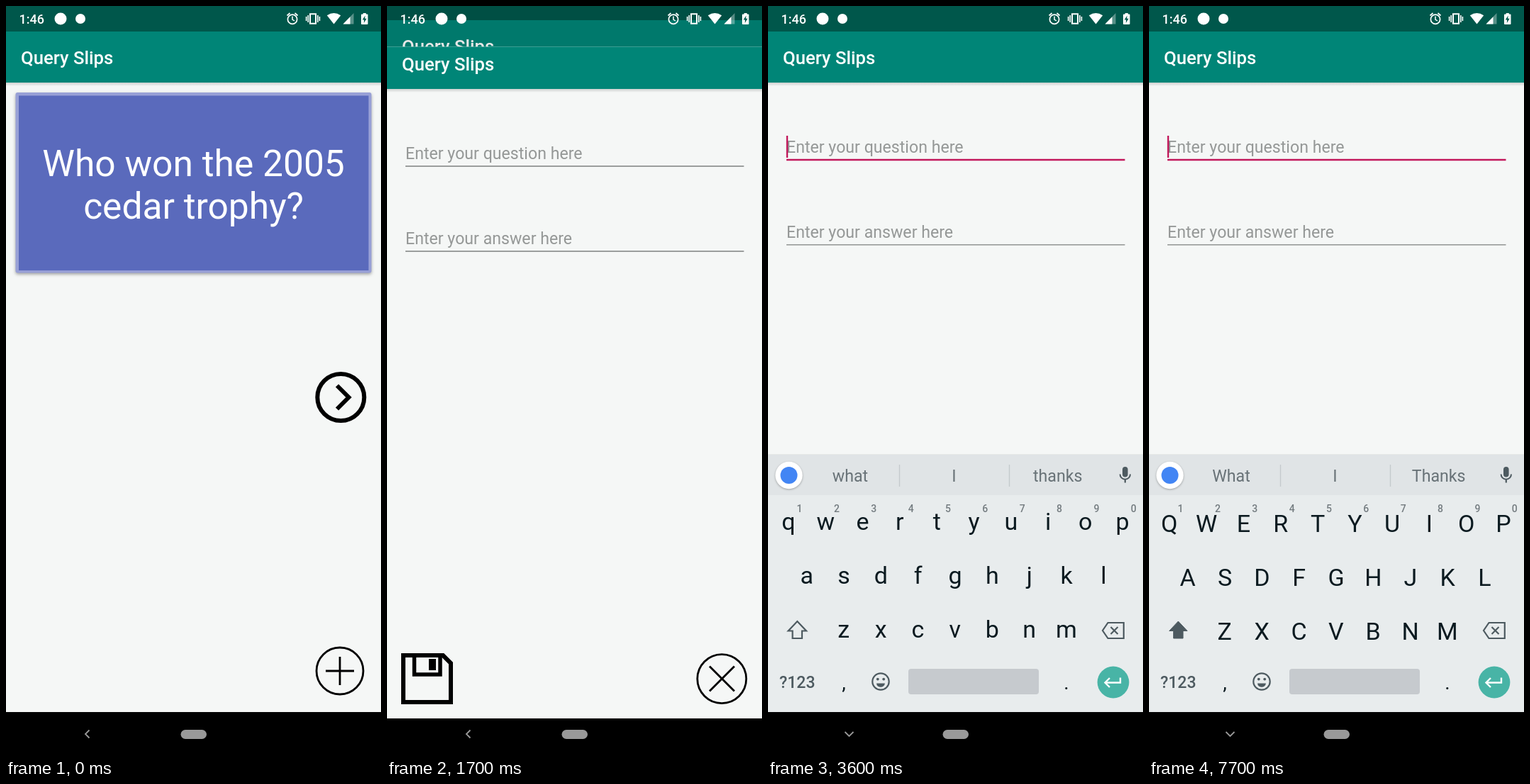
Recreate the animation shown at these times as an HTML page with a canvas. Size 529x1058 px, loop 8000 ms.

```html
<!DOCTYPE html>
<html lang="en">
<head>
<meta charset="utf-8">
<title>Flash cards</title>
<style>
html, body { margin: 0; width: 100%; height: 100%; overflow: hidden; background: #000; }
canvas { display: block; width: 100%; height: 100%; }
</style>
</head>
<body>
<canvas id="stage" width="529" height="1058"></canvas>
<script>
const W = 529, H = 1058, NAV = 996, LOOP = 8000;
const OPEN = 1483, FOCUS = 2500, KEYBOARD = 2610, SHIFT = 4100;
const BLINKS = [3100, 3600, 4100, 4600, 5100, 5600, 6100, 6600, 7200, 7700];
const PAPER = '#f5f7f6', PINK = '#c2185b', KEY = '#0b1a20', ICON = '#4d5a60';

const screen = document.getElementById('stage').getContext('2d');
const layer = document.createElement('canvas');
layer.width = W;
layer.height = H;
let c = screen;

// drawing helpers
function rect(x, y, w, h, fill, r = 0) {
  c.fillStyle = fill;
  c.beginPath();
  c.roundRect(x, y, w, h, r);
  c.fill();
}

function disc(x, y, r, fill) {
  c.fillStyle = fill;
  c.beginPath();
  c.arc(x, y, r, 0, 7);
  c.fill();
}

function ring(x, y, r, width, color) {
  c.strokeStyle = color;
  c.lineWidth = width;
  c.beginPath();
  c.arc(x, y, r, 0, 7);
  c.stroke();
}

function trace(points, close) {
  c.beginPath();
  for (let i = 0; i < points.length; i += 2) c.lineTo(points[i], points[i + 1]);
  if (close) c.closePath();
}

function line(points, width, color, close = false) {
  trace(points, close);
  c.strokeStyle = color;
  c.lineWidth = width;
  c.stroke();
}

function shape(points, fill) {
  trace(points, true);
  c.fillStyle = fill;
  c.fill();
}

function text(str, x, y, size, color, align = 'left', weight = 400) {
  c.font = `${weight} ${size}px Roboto, sans-serif`;
  c.textAlign = align;
  c.fillStyle = color;
  c.fillText(str, x, y);
}

function fade(y, h, alpha) {
  const g = c.createLinearGradient(0, y, 0, y + h);
  g.addColorStop(0, `rgba(0,0,0,${alpha})`);
  g.addColorStop(1, 'rgba(0,0,0,0)');
  c.fillStyle = g;
  c.fillRect(0, y, W, h);
}

// easing
const clamp = v => Math.min(1, Math.max(0, v));
const progress = (t, start, length) => clamp((t - start) / length);

function bezier(x, [x0, y0, x1, y1, x2, y2, x3, y3]) {
  const at = (s, a, b, d, e) =>
    a * (1 - s) ** 3 + 3 * b * s * (1 - s) ** 2 + 3 * d * s * s * (1 - s) + e * s ** 3;
  let lo = 0, hi = 1;
  for (let i = 0; i < 24; i++) {
    const mid = (lo + hi) / 2;
    if (at(mid, x0, x1, x2, x3) < x) lo = mid; else hi = mid;
  }
  return at(lo, y0, y1, y2, y3);
}

const slowIn = x => bezier(x, [0, 0, 0.4, 0, 0.2, 1, 1, 1]);
const extraSlowIn = x => x < 1 / 6
  ? bezier(x, [0, 0, 0.05, 0, 0.1333, 0.06, 0.1667, 0.4])
  : bezier(x, [0.1667, 0.4, 0.2083, 0.82, 0.25, 1, 1, 1]);

// screens
function frame() {
  rect(0, 0, W, NAV, PAPER);
  fade(108, 5, 0.16);
  rect(0, 0, W, 36, '#00574b');
  rect(0, 36, W, 72, '#008577');
  text('Query Slips', 21, 82, 25.7, '#fff', 'left', 500);
}

function cardScreen() {
  frame();
  c.save();
  c.shadowColor = 'rgba(0,0,0,.35)';
  c.shadowBlur = 4;
  c.shadowOffsetY = 2;
  rect(13.5, 122, 502, 254.5, '#98a0d6', 3);
  c.restore();
  rect(18, 126.5, 493.5, 246.5, '#5a6abc');
  text('Who won the 2005', 264.5, 240, 51.5, '#fff', 'center');
  text('cedar trophy?', 264.5, 300, 51.5, '#fff', 'center');

  ring(472.3, 552, 33, 6, '#000');
  line([467, 535.5, 483.5, 552, 467, 568.5], 6, '#000');
  ring(471, 938, 33, 2.8, '#000');
  line([451, 938, 491, 938], 2.8, '#000');
  line([471, 918, 471, 958], 2.8, '#000');
}

function field(hint, y, focused) {
  text(hint, 26, y - 10, 23.15, '#959897');
  if (focused) rect(26, y - 1.2, 477.5, 2.5, PINK);
  else rect(26, y - 0.8, 477.5, 1.4, '#7e807f');
}

function formScreen(t) {
  const focused = t >= FOCUS;
  frame();
  field('Enter your question here', 217, focused);
  field('Enter your answer here', 337, false);
  const blinks = BLINKS.filter(b => t >= b).length;
  if (focused && blinks % 2 === 0) rect(25.8, 183, 2.4, 31, PINK);

  line([23, 907, 79, 907, 90, 918, 90, 973, 23, 973], 6, '#000', true);
  line([38.5, 907, 38.5, 934, 75, 934, 75, 907], 5.5, '#000');
  rect(59, 912, 10, 16, '#000');
  ring(472.3, 940, 34.5, 2.8, '#000');
  line([455, 922.5, 490, 957.5], 2.8, '#000');
  line([490, 922.5, 455, 957.5], 2.8, '#000');
}

function statusIcons() {
  const white = '#fff';
  text('1:46', 18.5, 25, 18, white, 'left', 500);
  disc(77, 18, 8.5, white);
  disc(105, 18, 7, white);

  ring(404, 18.8, 6.6, 1.7, white);
  line([404, 14.5, 404, 19, 407, 21], 1.5, white);
  line([396.5, 13.5, 400.5, 10], 1.7, white);
  line([411.5, 13.5, 407.5, 10], 1.7, white);

  line([429, 11.3, 437, 11.3, 437, 24.7, 429, 24.7], 2, white, true);
  for (const side of [-1, 1]) {
    line([433 + side * 6.8, 13, 433 + side * 6.8, 23], 1.6, white);
    line([433 + side * 9.4, 15, 433 + side * 9.4, 21], 1.6, white);
  }

  c.fillStyle = white;
  c.beginPath();
  c.moveTo(462.5, 25.5);
  c.lineTo(452.8, 13.3);
  c.quadraticCurveTo(462.5, 6.5, 472.2, 13.3);
  c.fill();

  shape([490.5, 10, 490.5, 25.5, 475.5, 25.5], 'rgba(255,255,255,.35)');
  shape([485.5, 15.2, 485.5, 25.5, 475.5, 25.5], white);

  rect(501, 11.5, 9.5, 14.5, white, 1);
  rect(503.8, 10, 4, 2, white);
  shape([506.6, 13.5, 502.8, 19.6, 505.2, 19.6, 504.8, 24, 508.7, 17.8, 506.2, 17.8], '#00574b');
}

function navIcons(down) {
  const glow = 'rgba(255,255,255,.6)';
  rect(246.5, 1021, 36.5, 13, glow, 6.5);
  line(down ? [108.5, 1024, 114.5, 1030, 120.5, 1024] : [117.5, 1021.5, 112, 1027, 117.5, 1032.5], 1.8, glow);
}

// keyboard
function keyRow(keys, x, y, upper) {
  [...keys].forEach((k, i) =>
    text(upper ? k.toUpperCase() : k, x + i * 52.35, upper ? y + 3 : y, 34, KEY, 'center'));
}

function suggestions(upper) {
  rect(0, 633, W, 57, '#e0e4e6');
  c.save();
  c.shadowColor = 'rgba(0,0,0,.3)';
  c.shadowBlur = 3;
  c.shadowOffsetY = 1;
  disc(29.5, 662, 19.2, '#fff');
  c.restore();
  disc(29.5, 662, 12, '#4285f4');
  const words = upper ? ['What', 'I', 'Thanks'] : ['what', 'I', 'thanks'];
  [116, 262.5, 408.7].forEach((x, i) => text(words[i], x, 671, 23.2, '#687277', 'center'));
  for (const x of [185.5, 340.5]) rect(x - 0.7, 647, 1.4, 31, '#c4cacd');

  rect(500, 650, 7.6, 14.5, ICON, 3.8);
  c.strokeStyle = ICON;
  c.lineWidth = 2;
  c.beginPath();
  c.arc(503.8, 660.5, 7.2, 0, Math.PI);
  c.stroke();
  line([503.8, 667.5, 503.8, 672.5], 2.2, ICON);
}

function specialKeys(upper) {
  const arrow = [41.3, 868, 54, 881.5, 48, 881.5, 48, 892, 34.6, 892, 34.6, 881.5, 28.6, 881.5];
  if (upper) shape(arrow, ICON);
  line(arrow, upper ? 1 : 2.2, ICON, true);

  line([479.5, 870, 501.8, 870, 501.8, 892, 479.5, 892, 472, 881], 2.2, ICON, true);
  line([483.5, 876, 493.5, 886], 2.2, ICON);
  line([493.5, 876, 483.5, 886], 2.2, ICON);

  text('?123', 41.3, 961.5, 23, ICON, 'center', 500);
  text(',', 107, 964, 28, KEY, 'center');
  text('.', 421, 964, 28, KEY, 'center');

  ring(159, 953, 11.7, 2.2, ICON);
  disc(154.8, 949.6, 1.9, ICON);
  disc(163.2, 949.6, 1.9, ICON);
  c.fillStyle = ICON;
  c.beginPath();
  c.arc(159, 954.8, 6, 0.1, Math.PI - 0.1);
  c.fill();

  rect(198, 935, 184, 36, '#c6cace', 4);
  disc(487, 954, 22.4, '#48b4a6');
  line([497, 947.5, 497, 954.5, 476, 954.5], 2.4, '#fff');
  line([482, 948, 475.5, 954.5, 482, 961], 2.4, '#fff');
}

function keyboard(upper) {
  c.clearRect(0, 0, W, H);
  rect(0, 632, W, 1, 'rgba(0,0,0,.06)');
  rect(0, 633, W, NAV - 633, '#e8eced');
  suggestions(upper);
  keyRow('qwertyuiop', 28.8, 739, upper);
  keyRow('asdfghjkl', 54.7, 815, upper);
  keyRow('zxcvbnm', 106.8, 890.5, upper);
  [...'1234567890'].forEach((n, i) =>
    text(n, 44.6 + i * 52.35, 713.5, 14, '#747c80', 'center', 500));
  specialKeys(upper);
}

function shifted(dy, paint) {
  c.save();
  c.translate(0, dy);
  paint();
  c.restore();
}

function openForm(t) {
  const x = progress(t, OPEN, 425), p = slowIn(x), reveal = extraSlowIn(x);
  shifted(-0.019 * H * p, cardScreen);
  rect(0, 0, W, NAV, `rgba(0,0,0,${0.1 * reveal})`);
  shifted(0.041 * H * (1 - p), () => {
    c.beginPath();
    c.rect(0, (1 - reveal) * H, W, H);
    c.clip();
    formScreen(t);
  });
}

function draw(t) {
  c = screen;
  rect(0, 0, W, H, '#000');
  if (t < OPEN) cardScreen();
  else if (t < OPEN + 425) openForm(t);
  else formScreen(t);

  if (t >= KEYBOARD) {
    const p = 1 - (1 - progress(t, KEYBOARD, 220)) ** 2;
    c = layer.getContext('2d');
    keyboard(t >= SHIFT);
    c = screen;
    c.globalAlpha = p;
    c.drawImage(layer, 0, Math.round(120 * (1 - p)));
    c.globalAlpha = 1;
  }
  statusIcons();
  navIcons(t >= KEYBOARD);
}

const begin = performance.now();
function tick() {
  draw((performance.now() - begin) % LOOP);
  requestAnimationFrame(tick);
}
tick();
</script>
</body>
</html>
```
